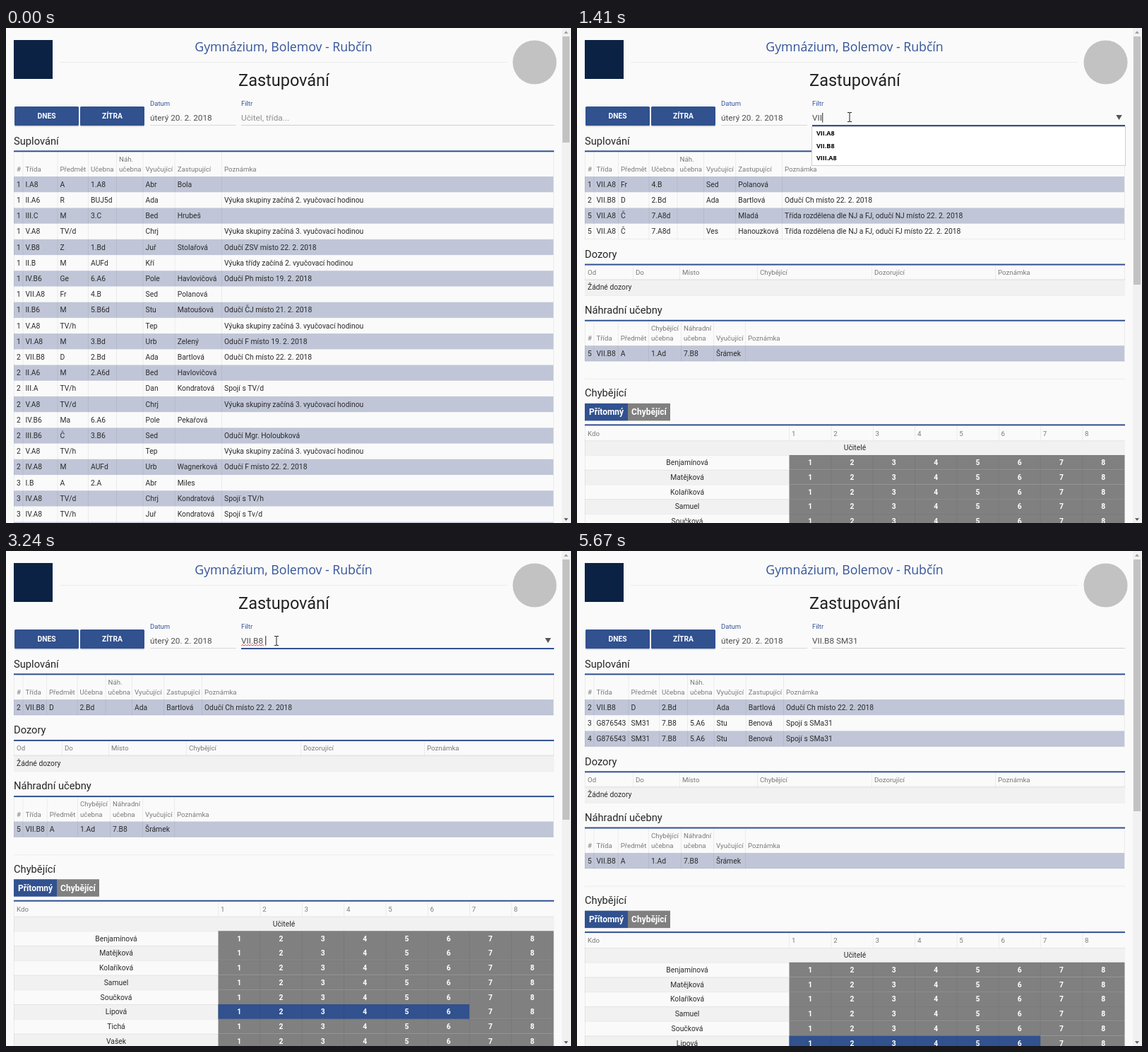
These frames come from a looping animation (800x700 px, 5700 ms). An HTML page:

```html
<!DOCTYPE html>
<html lang="cs">
<head>
<meta charset="utf-8">
<title>Zastupování</title>
<style>
html, body { margin: 0; width: 100%; height: 100%; overflow: hidden; background: #fafafa; }
svg { display: block; width: 800px; height: 700px; font-family: Roboto, sans-serif; }
text { white-space: pre; }
.cell { font-size: 10.35px; fill: #2b2b2b; }
.th { font-size: 9.7px; fill: #7a7a7a; }
.h2 { font-size: 14.7px; fill: #262626; }
.in { font-size: 11.8px; fill: #505050; }
.lab { font-size: 9.5px; fill: #34549a; }
.opt { font: 700 9px "Open Sans", sans-serif; fill: #000; }
.num { font-size: 10.3px; font-weight: 700; fill: #fff; }
.mid { text-anchor: middle; }
</style>
</head>
<body>
<svg viewBox="0 0 800 700">
  <rect width="800" height="700" fill="#fafafa"/>
  <g id="page"></g>
  <g id="head"></g>
  <g id="field"></g>
  <text id="typed" class="in" x="333" y="131"></text>
  <g id="top"></g>
</svg>
<script>
const LOOP = 5700, TICK = 30, BLUE = '#31518f', STRIPE = '#c0c6d7', BG = '#fafafa';
const $ = id => document.getElementById(id);

const skupina = n => `Výuka skupiny začíná ${n}. vyučovací hodinou`;
const konec = 'Výuka skupiny končí po 6. vyučovací hodině';
const deleni = j => `Třída rozdělena dle NJ a FJ, odučí ${j} místo 22. 2. 2018`;

// hour | class | subject | room | new room | teacher | substitute | note
const lessons = `1|I.A8|A|1.A8||Abr|Bola|
1|II.A6|R|BUJ5d||Ada||${skupina(2)}
1|III.C|M|3.C||Bed|Hrubeš|
1|V.A8|TV/d|||Chrj||${skupina(3)}
1|V.B8|Z|1.Bd||Juř|Stolařová|Odučí ZSV místo 22. 2. 2018
1|II.B|M|AUFd||Kří||Výuka třídy začíná 2. vyučovací hodinou
1|IV.B6|Ge|6.A6||Pole|Havlovičová|Odučí Ph místo 19. 2. 2018
1|VII.A8|Fr|4.B||Sed|Polanová|
1|II.B6|M|5.B6d||Stu|Matoušová|Odučí ČJ místo 21. 2. 2018
1|V.A8|TV/h|||Tep||${skupina(3)}
1|VI.A8|M|3.Bd||Urb|Zelený|Odučí F místo 19. 2. 2018
2|VII.B8|D|2.Bd||Ada|Bartlová|Odučí Ch místo 22. 2. 2018
2|II.A6|M|2.A6d||Bed|Havlovičová|
2|III.A|TV/h|||Dan|Kondratová|Spojí s TV/d
2|V.A8|TV/d|||Chrj||${skupina(3)}
2|IV.B6|Ma|6.A6||Pole|Pekařová|
2|III.B6|Č|3.B6||Sed||Odučí Mgr. Holoubková
2|V.A8|TV/h|||Tep||${skupina(3)}
2|IV.A8|M|AUFd||Urb|Wagnerková|Odučí F místo 22. 2. 2018
3|I.B|A|2.A||Abr|Miles|
3|IV.A8|TV/d|||Chrj|Kondratová|Spojí s TV/h
3|IV.A8|TV/h|||Juř|Kondratová|Spojí s Tv/d
3|G876543|SM31|7.B8|5.A6|Stu|Benová|Spojí s SMa31
4|VI.A8|D|1.Ad|7.B8|Sol|Tomášková|Odučí ČJ místo 23. 2. 2018
4|G876543|SM31|7.B8|5.A6|Stu|Benová|Spojí s SMa31
5|VII.A8|Č|7.A8d|||Mladá|${deleni('NJ')}
5|VII.A8|Č|7.A8d||Ves|Hanouzková|${deleni('FJ')}
7|VI.B6|TV/d|||Chrj||${konec}
7|VI.B6|TV/h|||Kre||${konec}
8|VI.B6|TV/d|||Chrj||${konec}
8|VI.B6|TV/h|||Kre||${konec}`.split('\n');

const rooms = ['4|VI.A8|Č|1.Ad|7.B8|Tomášková|', '4|VI.A6|A|6.A6|AUMd|Mc Torlan|', '5|VII.B8|A|1.Ad|7.B8|Šrámek|'];
const staff = 'Benjamínová Matějková Kolaříková Samuel Součková Lipová Tichá Vašek'.split(' ');
const options = ('I.A8 I.B8 II.A8 III.A8 IV.A8 V.A8 V.B8 VI.A8 VII.A8 VII.B8 VIII.A8 I.A6 I.B6 II.A6 II.B6 III.A6 III.B6 ' +
  'IV.A6 IV.B6 V.A6 V.B6 VI.A6 VI.B6 I.A I.B II.A II.B II.C III.A III.B III.C IV.A IV.B IV.C').split(' ');
const people = [...staff, ...new Set(lessons.map(r => r.split('|')[6]))];

// [start, value]: the last entry not after t holds
const typing = [[0, ''], [900, 'V'], [1290, 'VI'], [1380, 'VII'], [2280, 'VII.B8'], [3240, 'VII.B8 '],
  [3540, 'VII.B8 S'], [3630, 'VII.B8 SM'], [3990, 'VII.B8 SM3'], [4050, 'VII.B8 SM31']];
// query, shift of the columns, note column, note column of rooms, scroll thumb end
const views = [[0, ['', 0, 309, 251, 162]], [960, ['v', 0, 309, 251, 172]], [1290, ['vi', -14.5, 294, 251, 313]],
  [1410, ['vii', -14.5, 294, 242, 363]], [2310, ['vii.b8', -15.5, 281, 242, 380]], [3630, ['vii.b8 sm', 0, 296, 242, 368]]];
const at = (list, t) => list.filter(e => e[0] <= t).pop()[1];
const within = (t, ...spans) => spans.some(([a, b]) => t >= a && t < b);

const rect = (x, y, w, h, fill, more = '') => `<rect x="${x}" y="${y}" width="${w}" height="${h}" fill="${fill}" ${more}/>`;
const text = (x, y, s, cls, more = '') => s ? `<text x="${x}" y="${y}" class="${cls}" ${more}>${s}</text>` : '';
const shape = (d, fill, more = '') => `<path d="${d}" fill="${fill}" ${more}/>`;
const faint = (x, y, w, h) => rect(x, y, w, h, '#000', 'opacity=".06"');
const match = (row, q) => q.split(' ').some(w => row.toLowerCase().includes(w));

function frame(y, end, cols) {
  return cols.slice(1).map(x => faint(x - 4, y, 1, end - y)).join('') +
    faint(11, y, 1, end - y) + faint(775, y, 1, end - y) + faint(11, end - 1, 765, 1);
}

function rowsAt(y, rows, cols) {
  return rows.map((row, i) => {
    const top = y + i * 22.21;
    return (i % 2 ? '' : rect(11, top, 764, 22.21, STRIPE)) +
      row.split('|').map((s, c) => text(cols[c], top + 14.7, s, 'cell')).join('');
  }).join('');
}

function heads(y, cols, names) {
  return names.map((n, i) => {
    const parts = n.split('/');
    return parts.map((p, k) => text(cols[i], y - (parts.length - 1 - k) * 14.2, p, 'th')).join('');
  }).join('');
}

const title = (y, s) => text(11, y - 9.7, s, 'h2') + rect(11, y - 1, 765, 2, BLUE);

function absence(y) {
  let s = faint(11, y + 24.5, 765, 1) + text(11, y + 50, 'Chybějící', 'h2') +
    rect(11, y + 59.5, 61, 24.5, BLUE) + rect(72, y + 59.5, 60, 24.5, '#808080');
  const tab = 'style="font-size:12px"';
  s += text(41.5, y + 76, 'Přítomný', 'num mid', tab) + text(102, y + 76, 'Chybějící', 'num mid', tab) +
    rect(11, y + 89, 765, 2, BLUE) + text(15, y + 105.3, 'Kdo', 'th') +
    rect(11, y + 112, 765, 20.5, '#f1f1f1') + faint(11, y + 112, 765, 1) +
    text(393.5, y + 126, 'Učitelé', 'cell mid');
  for (let c = 0; c < 8; c++)
    s += text(304 + c * 59.3, y + 105.3, c + 1, 'th') + (c ? faint(300.3 + c * 59.3, y + 91, 1, 21) : '');
  staff.forEach((name, i) => {
    const top = y + 132.6 + i * 20.75;
    s += (i % 2 ? rect(11, top, 290, 20.75, '#f1f1f1') : '') + faint(11, top, 290, 1) +
      text(156, top + 14.2, name, 'cell mid') + rect(300.5, top, 475, 20.8, '#808080');
    if (i === 5) s += rect(300.5, top, 355.6, 20.75, BLUE);
    s += faint(300.5, top, 475, 1);
    for (let c = 0; c < 8; c++)
      s += (c ? faint(300 + c * 59.3, top, 1, 20.75) : '') + text(330.2 + c * 59.3, top + 14.2, c + 1, 'num mid');
  });
  return s + faint(11, y + 91, 1, 400) + faint(300, y + 91, 1, 21);
}

function drawPage([query, shift, note, roomNote]) {
  const list = lessons.filter(r => match(r, query));
  const cols = [15, 27.5, ...[76.5, 120, 160, 197.5, 242.7].map(x => x + shift), note];
  let end = 210 + list.length * 22.21;
  let s = title(174.3, 'Suplování') +
    heads(203.3, cols, ['#', 'Třída', 'Předmět', 'Učebna', 'Náh./učebna', 'Vyučující', 'Zastupující', 'Poznámka']) +
    rowsAt(210, list, cols) + frame(175, end, cols);

  const duty = [15, 83, 149, 259, 421, 596];
  s += title(end + 35.7, 'Dozory') + heads(end + 50.2, duty, ['Od', 'Do', 'Místo', 'Chybějící', 'Dozorující', 'Poznámka']) +
    rect(11, end + 57, 765, 22, '#f1f1f1') + faint(11, end + 57, 765, 1) +
    text(15, end + 71.6, 'Žádné dozory', 'cell') + frame(end + 37, end + 57, duty) + faint(11, end + 79, 765, 1);

  const found = rooms.filter(r => match(r, query));
  const places = [15, 27.5, 61.7, 105, 151, 197, roomNote];
  const top = end + 150.3;
  end = top + found.length * 22.21;
  s += title(top - 35.4, 'Náhradní učebny') +
    heads(top - 7, places, ['#', 'Třída', 'Předmět', 'Chybějící/učebna', 'Náhradní/učebna', 'Vyučující', 'Poznámka']) +
    rowsAt(top, found, places) + frame(top - 34, end, places);
  return s + absence(end);
}

function drawHead() {
  const button = (x, s) => rect(x, 112.5, 91, 27, '#000', 'rx="1.5" opacity=".18"') +
    rect(x, 111, 91, 27, BLUE, 'rx="1.5"') + text(x + 45.5, 127.6, s, 'num mid');
  return rect(11, 17, 55, 55, '#0b2244') + '<circle cx="748.5" cy="48.5" r="31" fill="#c2c2c2"/>' +
    text(393, 33, 'Gymnázium, Bolemov - Rubčín', 'mid', `style="font:17.7px 'Open Sans',sans-serif" fill="#34549a"`) +
    faint(76, 48, 633, 1) + text(393.5, 81.5, 'Zastupování', 'mid', 'font-size="23.5" fill="#222"') +
    button(12, 'DNES') + button(105, 'ZÍTRA') +
    text(204, 109.7, 'Datum', 'lab') + text(333, 109.7, 'Filtr', 'lab') +
    text(204, 130.5, 'úterý 20. 2. 2018', 'in') + rect(204, 137, 122, 1, '#d8d8d8') + rect(333, 137, 443, 1, '#d0d0d0');
}

function triangle(x, y, w, h, fill) {
  return shape(`M${x - w} ${y - h}h${2 * w}L${x} ${y + h}z`, fill);
}

function pageBar(end, hot) {
  return rect(787, 0, 13, 700, '#f1f1f1') + rect(788, 12, 10, end - 12, hot ? '#a6a6a6' : '#c2c2c2') +
    triangle(793, 6, 3, -1.7, '#9a9a9a') + triangle(793, 695, 3, 1.7, '#555');
}

function dropdown(value, mouse) {
  const q = value.trim().toLowerCase();
  const list = [...options, ...people].filter(o => o.toLowerCase().includes(q));
  const long = list.length > 31;
  const h = long ? 556 : list.length * 17.8 + 1.5;
  let s = rect(332.5, 139.5, long ? 456 : 444, h, '#fff', 'stroke="#cfcfcf"');
  list.slice(0, 31).forEach((o, i) => {
    const y = 139.6 + i * 17.8;
    if (mouse && mouse[1] >= y && mouse[1] < y + 17.8) s += rect(333, y, 443, 17.8, '#cce4fd');
    s += text(339, y + 12.2, o, 'opt');
  });
  if (long) s += rect(777, 140, 11, 555, '#f1f1f1') + rect(777.5, 153, 10, q ? 200 : 133, '#c6c6c6') +
    triangle(782.5, 147, 3, -1.7, '#555') + triangle(782.5, 690, 3, 1.7, '#555');
  return s;
}

// start, end, from x, from y, to x, to y, bend
const moves = [[90, 510, 725, 34, 386, 126, 0], [1800, 2010, 386, 126, 376, 167, 0], [2250, 2610, 376, 167, 383, 127, 0],
  [4440, 4770, 383, 127, 447, 125, -7], [4950, 5010, 447, 125, 447, 127, 0], [5130, 5460, 447, 127, 812, 118, 0]];

function mouseAt(t) {
  if (t < 120 || t >= 5460) return null;
  const [a, b, x, y, x2, y2, bend] = moves.filter(m => m[0] <= t).pop();
  const u = Math.min(1, (t - a) / (b - a));
  const e = u * u * (3 - 2 * u);
  return [x + (x2 - x) * e, y + (y2 - y) * e + bend * Math.sin(Math.PI * e)];
}

function pointer([x, y]) {
  const overField = x > 333 && x < 776 && y > 113 && y < 139;
  return `<g transform="translate(${x} ${y})">` + (overField
    ? shape('M-3 -6.5h2q1 0 1 1q0 -1 1 -1h2M0 -5.5v11M-3 6.5h2q1 0 1 -1q0 1 1 1h2', 'none', 'stroke="#222"')
    : shape('M0 0V12.5L2.9 9.8L5 14.5L7 13.6L5 9.1H8.9Z', '#fff', 'stroke="#222" stroke-width=".9"')) + '</g>';
}

let shown = null;
function draw(t) {
  const view = at(views, t), value = at(typing, t), mouse = mouseAt(t);
  if (view !== shown) {
    $('page').innerHTML = drawPage(view);
    shown = view;
  }
  const focus = within(t, [540, 5670]);
  const typed = $('typed');
  typed.textContent = value || 'Učitel, třída...';
  typed.style.fill = value ? '' : '#8f8f8f';

  let field = '';
  if (focus) {
    const u = Math.min(1, (t - 510) / 210), half = 221.5 * u * u * (3 - 2 * u);
    field = rect(554.5 - half, 137, half * 2, 2, BLUE) + triangle(767.5, 126.5, 4.2, 3.5, '#555');
  }
  $('field').innerHTML = field;

  let top = pageBar(view[4], mouse && mouse[0] >= 787);
  if (within(t, [3240, 5670])) {
    let d = 'M333 134';
    for (let i = 0; i < 16; i++) d += `l2 ${i % 2 ? 1.6 : -1.6}`;
    top += shape(d, 'none', 'stroke="#e02020" stroke-width=".8"');
  }
  if (within(t, [540, 2280], [2760, 3240])) top += dropdown(value, mouse);
  if (within(t, [540, 1860], [2310, 2580], [2760, 4560], [5010, 5460])) {
    const x = 333 + (value ? typed.getComputedTextLength() + .3 : 0);
    top += rect(x, 120, 1, 13.5, '#222');
  }
  if (mouse) top += pointer(mouse);
  $('top').innerHTML = top;
}

$('head').innerHTML = drawHead();
const begin = performance.now();
let last = -1;
function loop() {
  const t = Math.floor(((performance.now() - begin) % LOOP) / TICK) * TICK;
  if (t !== last) draw(last = t);
  requestAnimationFrame(loop);
}
loop();
</script>
</body>
</html>
```
